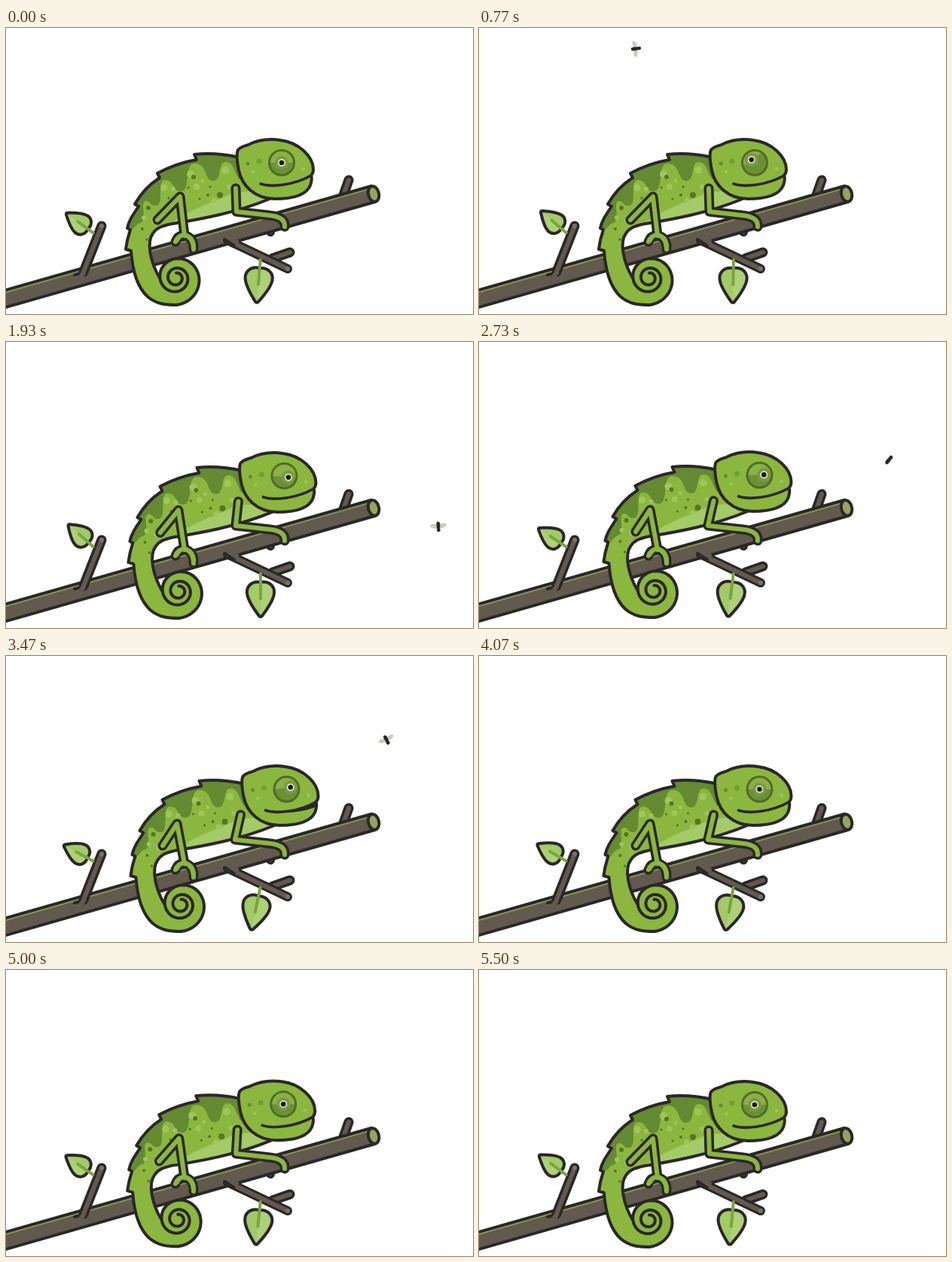
Animation, 620 px wide and 380 px high, one loop 5530 ms. Source, as an HTML page with a canvas:

```html
<!DOCTYPE html>
<html lang="en">
<head>
<meta charset="utf-8">
<title>Chameleon and fly</title>
<style>
html, body { margin: 0; width: 100%; height: 100%; overflow: hidden; background: #fff; }
canvas { display: block; }
</style>
</head>
<body>
<canvas id="stage" width="620" height="380"></canvas>
<script>
const ctx = document.getElementById('stage').getContext('2d');
const LOOP = 5530, TAU = Math.PI * 2;
const INK = '#2b2729', SKIN = '#8bb73e', DARK = '#648a32', BELLY = '#a3cb67', PALE = '#9fc65c';
const BARK = '#625a4e', MOSS = '#92a65c', LEAF = '#a2ca66', STEM = '#79a63c';

const clamp = v => Math.max(0, Math.min(1, v));
const ramp = (t, a, b) => { const p = clamp((t - a) / (b - a)); return p * p * (3 - 2 * p); };

// Smooth curve through rows of [time, value, ...]
function follow(rows, t) {
  const last = rows.length - 1;
  if (t <= rows[0][0]) return rows[0].slice(1);
  if (t >= rows[last][0]) return rows[last].slice(1);
  let i = 0;
  while (t > rows[i + 1][0]) i++;
  const a = rows[i], b = rows[i + 1], h = b[0] - a[0], s = (t - a[0]) / h;
  const slope = (j, c) => {
    const p = rows[Math.max(0, j - 1)], n = rows[Math.min(last, j + 1)];
    return (n[c] - p[c]) / (n[0] - p[0]);
  };
  return a.slice(1).map((v, k) => {
    const c = k + 1, s2 = s * s, s3 = s2 * s;
    return (2 * s3 - 3 * s2 + 1) * v + (s3 - 2 * s2 + s) * h * slope(i, c) +
      (3 * s2 - 2 * s3) * b[c] + (s3 - s2) * h * slope(i + 1, c);
  });
}

const CATCH = 3690, SWALLOW = 3900;
const flight = [
  [100, -22, 78], [400, 76, 58], [630, 154, 39], [770, 208, 27.5], [950, 278, 24],
  [1200, 368, 37], [1500, 474, 88], [1770, 550, 172], [1930, 574, 245], [2080, 560, 300],
  [2250, 518, 314], [2400, 493, 274], [2570, 504, 208], [2730, 544, 157], [2880, 582, 110],
  [3010, 599, 58], [3110, 583, 25], [3210, 545, 24], [3350, 503, 62], [3470, 505, 111],
  [3570, 544, 150], [CATCH, 608, 172]
];
const sway = [[0, 5], [770, 1], [1400, -.6], [1930, 0], [2730, 7], [3600, 12.2], [4630, 7], [LOOP, 5]];

function fill(path, color) { ctx.fillStyle = color; ctx.fill(path); }
function stroke(path, width = 4, color = INK) {
  ctx.lineWidth = width;
  ctx.strokeStyle = color;
  ctx.stroke(path);
}
function dot(x, y, r, color) {
  ctx.fillStyle = color;
  ctx.beginPath();
  ctx.arc(x, y, r, 0, TAU);
  ctx.fill();
}
function tube(d, color, outer = 13, inner = 6) {
  const path = new Path2D(d);
  stroke(path, outer);
  stroke(path, inner, color);
}
function at(x, y, draw, angle = 0) {
  ctx.save();
  ctx.translate(x, y);
  ctx.rotate(angle);
  draw();
  ctx.restore();
}

// Body outline with the coil of the tail
const coil = k => {
  const a = Math.PI / 2 * (1 - k), r = 36 * Math.exp(-.17 * k);
  return [226 + r * Math.cos(a), 332 + r * Math.sin(a)];
};
const back = 'M310 172C288 167 268 166 250 168L253 175C235 178 218 184 201 193L204 199' +
  'C190 208 179 220 171 234L176 237C168 249 163 256 161 266L165 268C162 277 160 286 159 294' +
  'L166 296C168 325 175 345 188 357C200 367 212 368 226 368';
const body = new Path2D(back);
const curl = new Path2D();
curl.moveTo(226, 368);
for (let k = 0; k <= 10; k += .1) {
  const p = coil(k);
  if (k < 3.05) body.lineTo(...p);
  curl.lineTo(...p);
}
body.bezierCurveTo(192, 312, 186, 285, 195, 273);
body.bezierCurveTo(200, 265, 208, 263, 216, 261);
body.bezierCurveTo(245, 256, 300, 248, 350, 227);
body.lineTo(350, 180);
body.closePath();

const saddle = new Path2D('M312 160L312 202C304 200 304 178 292 178C280 178 288 203 275 203' +
  'C263 203 268 180 250 180C236 180 246 217 232 217C220 217 224 202 211 202' +
  'C199 202 211 235 199 236C191 237 192 229 185 230C177 233 189 256 178 259' +
  'C172 260 172 267 163 270L140 270L190 170Z');
const belly = new Path2D('M214 264C240 242 272 233 302 219L340 215L352 228L300 250L240 262Z');
const head = new Path2D('M308 162C312 157 317 157 322 155C336 148 350 147 364 149' +
  'C389 152 408 171 408 188Q408 193 405 196Q407 200 404 209C398 224 377 227 357 227' +
  'C330 227 313 209 309 189C307 179 305 168 308 162Z');

const darkSpots = [
  [284, 222, 4], [249, 198, 3], [271, 211, 1.6], [268, 222, 2], [257, 227, 1.6],
  [242, 212, 1.6], [189, 239, 3], [181, 267, 2], [187, 281, 1.8], [216, 226, 1.7], [203, 246, 1.5]
];
const paleSpots = [
  [291, 189, 5], [245, 194, 5], [210, 212, 4.5], [276, 229, 3.5], [253, 211, 4],
  [296, 211, 3], [197, 256, 4], [183, 252, 3], [261, 203, 2.5], [222, 214, 3]
];

function leaf(x, y, angle, size) {
  at(x, y, () => {
    ctx.scale(size, size);
    const shape = new Path2D('M0 13C13 11 19 20 18 28C17 38 8 50 2 58Q0 60 -2 58C-8 50 -17 38 -18 28C-19 20 -13 11 0 13Z');
    fill(shape, LEAF);
    fill(new Path2D('M0 14C12 12 18 20 17 28C16 38 8 50 0 58Z'), '#aed078');
    stroke(shape, 4 / size);
    stroke(new Path2D('M0 2V35'), 4 / size, STEM);
  }, angle * Math.PI / 180);
}

function branch(angle) {
  tube('M448 222L455 202', BARK);
  tube('M348 266L351 271', BARK, 12, 5);
  const log = new Path2D('M-8 350.3L485 210L490 231L-8 373.3Z');
  fill(log, BARK);
  stroke(new Path2D('M-8 353.3L483 213.5'), 2, '#899b50');
  stroke(log);
  ctx.beginPath();
  ctx.ellipse(488, 220.5, 7, 10.5, -.25, 0, TAU);
  ctx.fillStyle = MOSS;
  ctx.fill();
  ctx.lineWidth = 4;
  ctx.strokeStyle = INK;
  ctx.stroke();

  stroke(new Path2D('M91 328L103 325'), 4);
  tube('M103 324L127 263', BARK);
  stroke(new Path2D('M103 325L99 331'), 6, BARK);
  tube('M354 306L377 298', BARK);
  tube('M294 282L374 320', BARK, 12, 6);
  stroke(new Path2D('M292 277L306 284'), 6, BARK);
  stroke(new Path2D('M291 281L303 289'), 3.5);
  dot(127, 263, 3, '#7b7464');
  dot(374, 320, 3, '#7b7464');

  leaf(117, 273, 126 - (angle - 5) * 1.1, .77);
  leaf(338, 306, angle, 1);
}

function eye(look) {
  dot(366, 179, 18, '#536a2b');
  dot(366, 179, 15, '#6c9036');
  ctx.save();
  ctx.beginPath();
  ctx.arc(366, 179, 15, 0, TAU);
  ctx.clip();
  at(366 + look[0], 179 + look[1], () => {
    fill(new Path2D('M-26 0L-26 -30L26 -30L26 0Z'), '#8ab047');
    dot(0, 0, 9, '#789c3e');
    dot(0, 0, 5, '#e3ead3');
    dot(0, 0, 3.3, '#171619');
  }, Math.atan2(look[1], look[0] + 7) * .6);
  ctx.restore();
}

function chameleon(lean, look, gape) {
  const dx = 6.5 * lean, dy = -2 * lean;
  at(dx, dy, () => {
    fill(body, SKIN);
    ctx.save();
    ctx.clip(body);
    fill(belly, BELLY);
    fill(saddle, DARK);
    paleSpots.forEach(s => dot(...s, PALE));
    darkSpots.forEach(s => dot(...s, '#557628'));
    ctx.restore();
    stroke(new Path2D(back));
    stroke(curl);
    stroke(new Path2D('M204 332C192 312 186 285 195 273C200 265 208 263 216 261C245 256 300 248 350 227'));

    fill(head, SKIN);
    dot(321, 180, 2.5, DARK);
    dot(336, 177, 3.5, '#759d36');
    dot(328, 191, 2.2, PALE);
    dot(395, 187, 2.2, PALE);
    stroke(head);
    eye(look);
    stroke(new Path2D('M338 207C352 212 382 209 405 196'), 3.6);
    if (gape > 0) fill(new Path2D(`M366 209Q388 206 407 194L${405 - gape} ${196 + 7 * gape}Q385 210 366 210Z`), INK);
  });

  const hip = `${201 + 7 * lean} ${255 - 3 * lean}`, knee = `${231 - 4 * lean} ${224 - lean}`;
  tube('M225 284Q228 276 236 275Q250 278 249 294', SKIN);
  tube(`M${hip}L${knee}L237 276`, SKIN);
  stroke(new Path2D('M227 282Q230 275 237 275Q249 278 249 293'), 6, SKIN);
  tube(`M${305 + dx} ${213 + dy}L${306 - 2 * lean} 244L350 249Q371 251 370 264`, SKIN);
}

function fly(x, y, angle, t) {
  const spread = .15 + .85 * Math.abs(Math.cos(Math.PI * (t - 770) / 64.4));
  at(x, y, () => {
    ctx.fillStyle = '#c8ceb6';
    for (const side of [-1, 1]) {
      ctx.beginPath();
      ctx.ellipse(-1, side * 5.5 * spread, 2.8, 5.5 * spread, side * .25, 0, TAU);
      ctx.fill();
    }
    ctx.fillStyle = INK;
    ctx.beginPath();
    ctx.ellipse(-2.5, 0, 4.2, 2.5, 0, 0, TAU);
    ctx.fill();
    dot(1.5, 0, 2.3, INK);
    dot(4.4, 0, 2.4, INK);
  }, angle);
}

function draw(t) {
  ctx.clearRect(0, 0, 620, 380);
  ctx.lineCap = ctx.lineJoin = 'round';

  const lean = ramp(t, 1050, 2750) - ramp(t, 4250, 5480);
  const gape = ramp(t, 3330, 3470) + .5 * ramp(t, 3540, 3600) - 1.5 * ramp(t, 3870, 4010);
  const reach = t < CATCH ? ramp(t, 3570, CATCH) : 1 - ramp(t, CATCH, SWALLOW);
  const mouth = [396 + 6.5 * lean, 203 - 2 * lean];

  let bug = follow(flight, t);
  const end = follow(flight, CATCH);
  const tip = mouth.map((m, i) => m + (end[i] - m) * reach);
  const next = follow(flight, Math.min(t, CATCH - 8) + 8), prev = follow(flight, Math.min(t, CATCH) - 8);
  const heading = Math.atan2(next[1] - prev[1], next[0] - prev[0]);
  if (t > CATCH) bug = tip;

  const ex = bug[0] - 366 - 6.5 * lean, ey = bug[1] - 179 + 2 * lean;
  const gaze = 5.8 * (ramp(t, 110, 420) - ramp(t, CATCH, SWALLOW)) / Math.hypot(ex, ey);

  branch(follow(sway, t)[0]);
  chameleon(lean, [ex * gaze, ey * gaze], gape);

  if (reach > .01) {
    const tongue = new Path2D(`M${mouth}L${tip}`);
    stroke(tongue, 8);
    dot(...tip, 7, INK);
    stroke(tongue, 4, '#dd6674');
    dot(...tip, 4.5, '#dd6674');
  }
  if (t > 100 && t < SWALLOW) fly(...bug, heading, t);
}

function tick() {
  draw(performance.now() % LOOP);
  requestAnimationFrame(tick);
}
tick();
</script>
</body>
</html>
```
